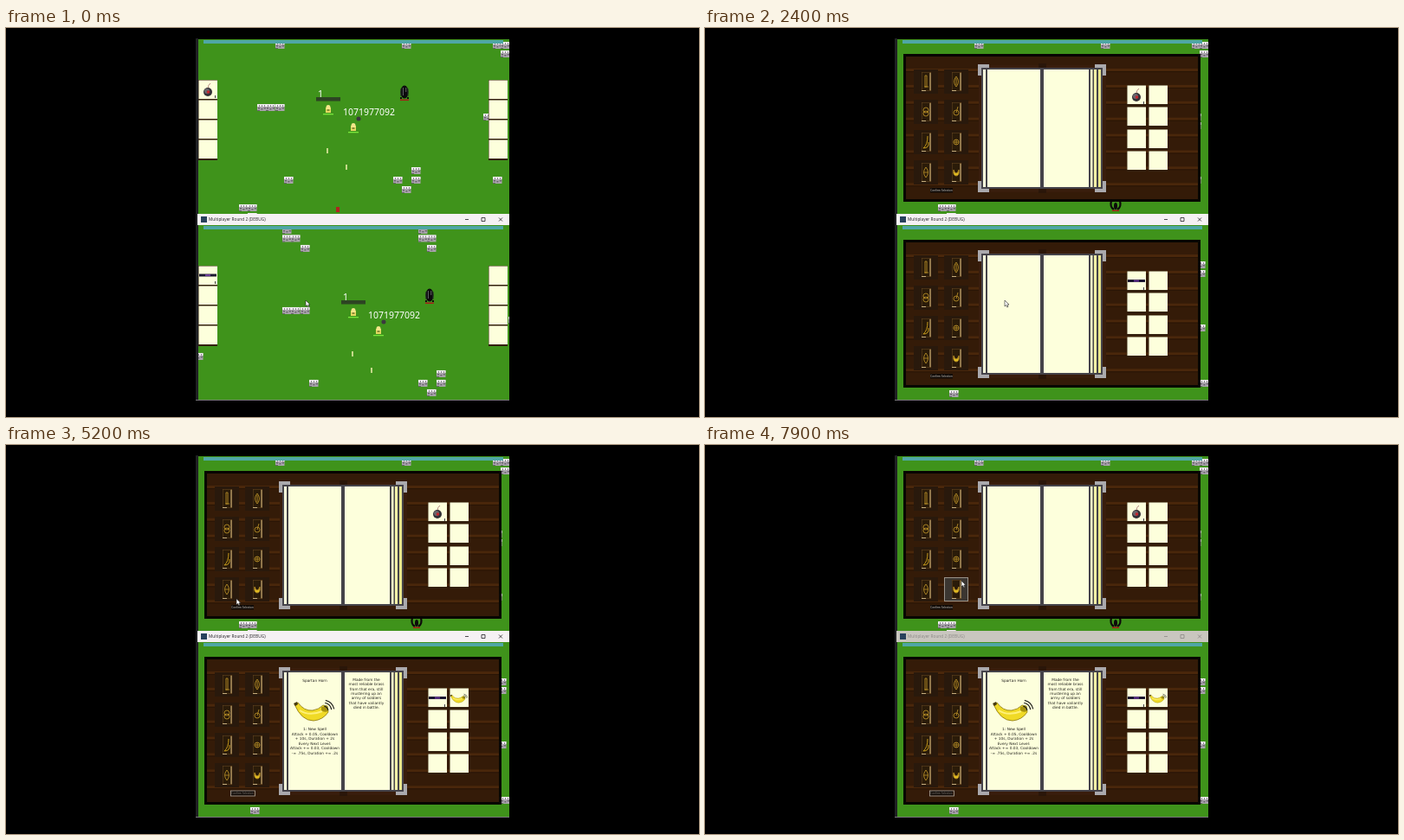
Animation of 800x450 px, one loop 8000 ms. Source, as an HTML page with a canvas:

```html
<!DOCTYPE html>
<html lang="en">
<head>
<meta charset="utf-8">
<style>
html, body { margin: 0; width: 100%; height: 100%; overflow: hidden; background: #000 }
canvas { display: block }
</style>
</head>
<body>
<canvas id="stage" width="800" height="450"></canvas>
<script>
const c = document.getElementById('stage').getContext('2d');
const LOOP = 8000, MENU = 1900, DROP = 215;
const CREAM = '#fdffdc', DARK = '#45434a';
const blocks = [[295, -1], [295, 8.5], [305, 8.5], [316, 20], [452, -1], [452, 8.5], [462, 8.5], [462, 20],
  [567, 20], [576, 20], [576, 30], [295, 92], [305, 92], [316, 92], [556, 103], [567, 103], [567, 113],
  [193, 145], [326, 176], [452, 176], [473, 165], [473, 176], [462, 187], [567, 176], [274, 208], [284, 208],
  [284, 218], [274, 228], [571, 240], [282, 252]];
const cardX = [255, 290], cardY = [62, 97, 132, 167];
const leftText = ['1: New Spell', 'Attack + 0.05, Cooldown', '+ 10s, Duration + 2s',
  'Every Next Level:', 'Attack += 0.03, Cooldown', '-= .75s, Duration += .2s'];
const rightText = ['Made from the', 'most reliable brass', 'from that era, still',
  'mustering up an', 'army of soldiers', 'that have valiantly', 'died in battle.'];

// Each key is [time, x, y]; values between keys are linear.
function along(keys, t) {
  let i = 0;
  while (i < keys.length - 2 && t > keys[i + 1][0]) i++;
  const [a, b] = [keys[i], keys[i + 1]];
  const u = Math.max(0, Math.min(1, (t - a[0]) / (b[0] - a[0])));
  return a.slice(1).map((v, k) => v + (b[k + 1] - v) * u);
}
function rect(color, x, y, w, h) { c.fillStyle = color; c.fillRect(x, y, w, h); }
function oval(color, x, y, rx, ry = rx) {
  c.fillStyle = color;
  c.beginPath();
  c.ellipse(x, y, rx, ry, 0, 0, 7);
  c.fill();
}
function path(d, fill, stroke, width = 1) {
  const p = new Path2D(d);
  if (fill) { c.fillStyle = fill; c.fill(p); }
  if (stroke) { c.strokeStyle = stroke; c.lineWidth = width; c.stroke(p); }
}
function text(s, x, y, font, color, align = 'left') {
  c.font = font;
  c.fillStyle = color;
  c.textAlign = align;
  c.fillText(s, x, y);
}
function at(x, y, draw, angle = 0, scale = 1) {
  c.save();
  c.translate(x, y);
  c.rotate(angle);
  c.scale(scale, scale);
  draw();
  c.restore();
}

function block([x, y]) {
  rect('#a9a3ac', x - 5, y - 4, 10.5, 8);
  rect('#f0eef0', x - 5, y - 4, 10.5, 3);
  for (let i = 0; i < 3; i++) {
    rect('#8a858e', x - 3 + i * 3, y - 3, 1, 2);
    rect('#68636c', x - 4 + i * 3.4, y + i % 2, 2, 1.5);
  }
  rect('#67626a', x - 5, y + 3, 3, 1);
}
function bug(x, y, winged) {
  at(x, y, () => {
    if (winged) {
      path('M-5-6Q-7 1-2 4M5-6Q7 1 2 4', null, '#0d090b', 2.2);
      oval('#0d090b', 0, 0, 2, 4);
      rect('#a52018', -4, 4.5, 8, 1.5);
      return;
    }
    oval('#0c0b0d', 0, -1, 4.5, 7.5);
    path('M-4-5V4M4-5V4', null, '#26302a', 1);
    path('M-1.5-6V3M1.8-6V-1', null, '#77797c', .8);
    rect('#0c0b0d', -5, 5, 2, 2);
    rect('#0c0b0d', 3, 5, 2, 2);
    rect('#a52018', -5, 7.5, 10, 1.5);
  });
}
function pickup(x, y, age) {
  const s = Math.abs(Math.sin(age * Math.PI / 1000));
  at(x, y, () => rect('#fdf7b8', -.7 - 2.3 * s, -3 + s, 1.4 + 4.6 * s, 6 - 2 * s), -.65 * s);
}
function hero(x, y, winged) {
  if (winged) {
    path(`M${x - 6} ${y + 4}V${y - 2}L${x - 3} ${y - 6}H${x + 3}L${x + 6} ${y - 2}V${y + 4}L${x + 3} ${y + 1}H${x - 3}Z`, '#f8f09a');
    rect('#e3c33c', x - 2, y - 4, 4, 6);
  } else {
    rect('#e5dc62', x - 3, y - 2, 6, 6);
    oval('#f2e68a', x, y - 2, 2.5, 3);
    rect('#8a8a36', x - 1.5, y, 3, 2);
  }
  rect('#79e83c', x - 6, y + 5, 12, 1.3);
}
function label(s, x, y) {
  text(s, x - 12, y - 14, '10.5px "Noto Sans", sans-serif', '#fff');
}
function bomb(x, y, lit) {
  path(`M${x} ${y - 4}Q${x} ${y - 8} ${x + 3} ${y - 10}`, null, lit ? '#b58a80' : '#8a7a62', 1);
  oval('#333036', x, y, 5);
  oval('#6a666c', x - 1, y - 1, 3);
  oval(lit ? '#c5262e' : '#6f686c', x + .5, y, 1.8);
}
function staff(x, y) {
  rect('#1c1730', x - 10, y - 1.5, 20, 3);
  rect('#6a3b96', x - 3, y - 1, 6, 2);
}
function horn() {
  path('M333 85L337 83Q344 93 354 92 361 91 366 86L371 87 372 94Q366 103 355 104 341 104 333 85Z', '#f0da26', '#8a780e', .8);
  path('M339 92Q350 99 365 93', null, '#fff17a', 2);
  path('M364 88L370 87 372 93Q367 95 364 92Z', '#a8940f');
  path('M332 84L336 82 337 85 334 87Z', '#463b10');
  for (const r of [6, 10, 13]) {
    c.beginPath();
    c.arc(366, 93, r, -1.35, -.2);
    c.strokeStyle = '#22221e';
    c.lineWidth = 1.2;
    c.stroke();
  }
}
function slot(x, y) {
  rect('#33200f', x, y, 22, 24);
  rect(CREAM, x + .5, y + .5, 21.5, 21.5);
}

function world(t, p) {
  blocks.forEach(block);
  if (t < 500) bug(...along([[0, 460, 75], [500, 444, 85]], t));
  else if (t < MENU) pickup(444, 85, t - 500);
  bug(...along([[0, 500, 245], [1500, 485, 208], [MENU, 474, 206]], t), t >= MENU);
  if (t < 500) {
    const [x, y] = along([[0, 383, 210], [500, 383, 222]], t);
    rect('#b02420', x - 2, y - 3, 4, 6);
  } else if (t > 1100 && t < MENU) {
    at(...along([[1100, 535, 31], [1500, 525, 37], [MENU, 515, 43]], t), () => {
      rect('#b01f22', -5, -1, 10, 2.5);
      rect('#7c1618', -3, -2, 3, 4);
    }, -.5);
  }
  pickup(371, 142, t);
  pickup(393, 161, t);
  hero(401, 115);
  oval('#3b3a3e', ...along([[0, 407, 105], [1500, 410, 109]], t), 2.5);
  hero(...p, t > 1200);
  rect('#2d4423', p[0] - 14, p[1] - 14, 28, 4.5);
  label('1', ...p);
  label('1071977092', 401, 115);
}

function card(x, y, i, hover) {
  rect(hover ? '#3b3631' : '#29190c', x - 14, y - 14, 28, 28);
  if (hover) {
    c.strokeStyle = '#99938b';
    c.lineWidth = 1;
    c.strokeRect(x - 13.5, y - 13.5, 27, 27);
  }
  rect('#6a4a22', x - 5, y - 11, 11, 22);
  rect('#2a1b09', x - 4.5, y - 10.5, 9, 21);
  rect('#c5ad7d', x + 4.5, y - 10, 1, 20);
  rect('#c5ad7d', x - 5, y + 10, 5, 1);
  const marks = ['M-1-7H1V6H-1ZM-2 6H3', 'M0-6Q5 0 0 6Q-5 0 0-6M0-4V4', 'M-3-2a3 3 0 1 0 6 0a3 3 0 1 0-6 0M-3 2a3 3 0 1 0 6 0a3 3 0 1 0-6 0',
    'M-3 1a3 3 0 1 0 6 0a3 3 0 1 0-6 0M0 1L2-6', 'M2-7Q2 3-3 7Q4 7 3 0', 'M-3 0a3 3 0 1 0 6 0a3 3 0 1 0-6 0M-3 0H3M0-3V3',
    'M0-6Q5 0 0 6Q-5 0 0-6M-2 0H2', 'M-3-3Q-4 4 0 4Q4 4 3-3Q2 1 0 1Q-2 1-3-3'];
  at(x, y, () => path(marks[i], i === 7 ? '#e1bd20' : null, i === 4 ? '#d4a61c' : '#b38b26', .9));
}

// A page lifts off the right side and folds over the spine.
function flipPage(u) {
  const edge = 389 + 54 * Math.cos(Math.PI * u ** 1.5);
  const lift = 13 * Math.sqrt(Math.sin(Math.PI * u));
  const dir = Math.sign(edge - 389), span = Math.abs(edge - 389);
  for (let d = 2; d < span; d += 2) {
    const k = d / span;
    const x = 389 + dir * d - (dir < 0 ? 2 : 0);
    const top = 48 - Math.round(lift * Math.sin(Math.PI * (.15 + .82 * k)) / 2) * 2;
    const bottom = 184 - Math.round(lift * (.6 * Math.cos(2.3 * Math.abs(k - .2))) / 2) * 2;
    rect(DARK, x, top - 2, 2, bottom - top + 4);
    rect(CREAM, x, top, 2, bottom - top);
  }
}

function menu(o) {
  rect('#070402', 229, 30, 343, 171);
  rect('#341b08', 232, 33, 337, 165);
  for (let y = 47; y < 198; y += 18.9) {
    rect('#4a270b', 232, y, 337, 3);
    rect('#281405', 232, y + 3, 337, 1);
  }
  rect('#391d0c', 316, 43, 147, 147);
  rect('#2a1609', 385, 41, 9, 150);
  for (const x of [315, 450]) for (const y of [42, 177]) {
    rect('#aaa9ad', x, y < 100 ? y : y + 8, 13, 5);
    rect('#aaa9ad', x < 400 ? x : x + 8, y, 5, 13);
  }
  rect(DARK, 319, 46, 140, 140);
  rect(CREAM, 321, 48, 3, 136);
  rect(CREAM, 326, 48, 61, 136);
  rect(CREAM, 391, 48, 52, 136);
  rect('#fbfac8', 445, 48, 2.5, 136);
  rect('#f5f2a8', 449, 48, 3, 136);
  rect('#e8e58b', 454, 48, 3, 136);
  if (o.flip > 0 && o.flip < 1) flipPage(o.flip);
  if (o.page) {
    const line = (s, x, y) => text(s, x, y, '4.3px "DejaVu Sans", sans-serif', '#25231f', 'center');
    line('Spartan Horn', 356.5, 58.7);
    leftText.forEach((s, i) => line(s, 356.5, 115.4 + i * 5.5));
    rightText.forEach((s, i) => line(s, 416, 58 + i * 5.35));
    horn();
  }
  cardY.forEach((y, r) => cardX.forEach((x, k) => card(x, y, r * 2 + k, o.hover === r * 2 + k)));
  rect('#120c08', 260, 185, 26, 5.5);
  if (o.pressed) {
    c.strokeStyle = '#aaa49c';
    c.lineWidth = .8;
    c.strokeRect(259.5, 185, 28, 6);
  }
  text('Confirm Selection', 273, 189.2, '3.1px "Open Sans", sans-serif', o.pressed ? '#86817b' : '#d8d4ce', 'center');
  for (const x of [487, 512]) for (const y of [66, 91, 117, 142]) slot(x, y);
  if (o.lower) staff(498, 77.5);
  else bomb(498, 80, true);
  rect('#444', 506, 85, 1, 3);
  if (o.item) at(370, 38.5, horn, 0, .43);
}

function view(t, p, lower) {
  c.save();
  c.translate(0, lower ? DROP : 0);
  c.beginPath();
  c.rect(222, 13, 359, 202);
  c.clip();
  rect('#3f931b', 222, 13, 359, 202);
  at(lower ? 401 - p[0] : 0, lower ? 329 - DROP - p[1] : 0, () => world(t, p));
  rect('#4fa6a5', 228, 14, 346, 4);
  if (t < MENU) {
    for (const x of [222, 557]) for (let i = 0; i < 4; i++) slot(x, 60 + i * 23);
    if (lower) staff(233, 71);
    else bomb(233, 74, t < 700);
    rect('#444', 241, 78, 1, 3);
  } else if (lower) {
    menu({ lower, flip: (t - 4000) / 400, page: t > 4400, item: t > 4700, pressed: t > 4700,
      hover: t > 3500 && t < 4550 ? 4 : -1 });
  } else {
    menu({ flip: t < 7000 ? (t - 5750) / 400 : (t - 7450) / 400, page: t > 6150 && t < 7450,
      hover: t > 5500 && t < 6750 ? 4 : t > 7200 ? 7 : -1 });
  }
  c.restore();
}

function titleBar(active) {
  const ink = active ? '#242226' : '#8c8886';
  rect(active ? '#f5f1f4' : '#c9c6bf', 221, 215, 360, 13);
  rect('#28415c', 225, 218, 7, 7);
  text('Multiplayer Round 2 (DEBUG)', 234, 223, '4.8px "Open Sans", sans-serif', ink);
  path('M530 221.5H534M549 219.5H553V223.5H549ZM569 219.5L573 223.5M573 219.5L569 223.5', null, ink, .8);
}

function draw(t) {
  rect('#000', 0, 0, 800, 450);
  rect('#202124', 219, 12, 3, 419);
  rect('#77777a', 219, 430, 362, 1);
  const p = along([[0, 372, 94], [1500, 386, 141], [MENU, 396, 158]], t);
  view(t, p, false);
  view(t, p, true);
  titleBar(t < 5750);
  at(...along([[0, 346, 315], [2900, 346, 315], [3600, 262, 351], [4300, 262, 351], [4650, 272, 403],
    [4800, 272, 403], [5200, 266, 178], [5600, 266, 122], [6600, 266, 122], [7300, 296, 157], [8000, 296, 157]], t),
    () => path('M0 0V7L1.6 5.5 2.8 8 4 7.4 2.9 5H5Z', '#fff', '#222', .6));
}

function tick() {
  draw(performance.now() % LOOP);
  requestAnimationFrame(tick);
}
tick();
</script>
</body>
</html>
```
